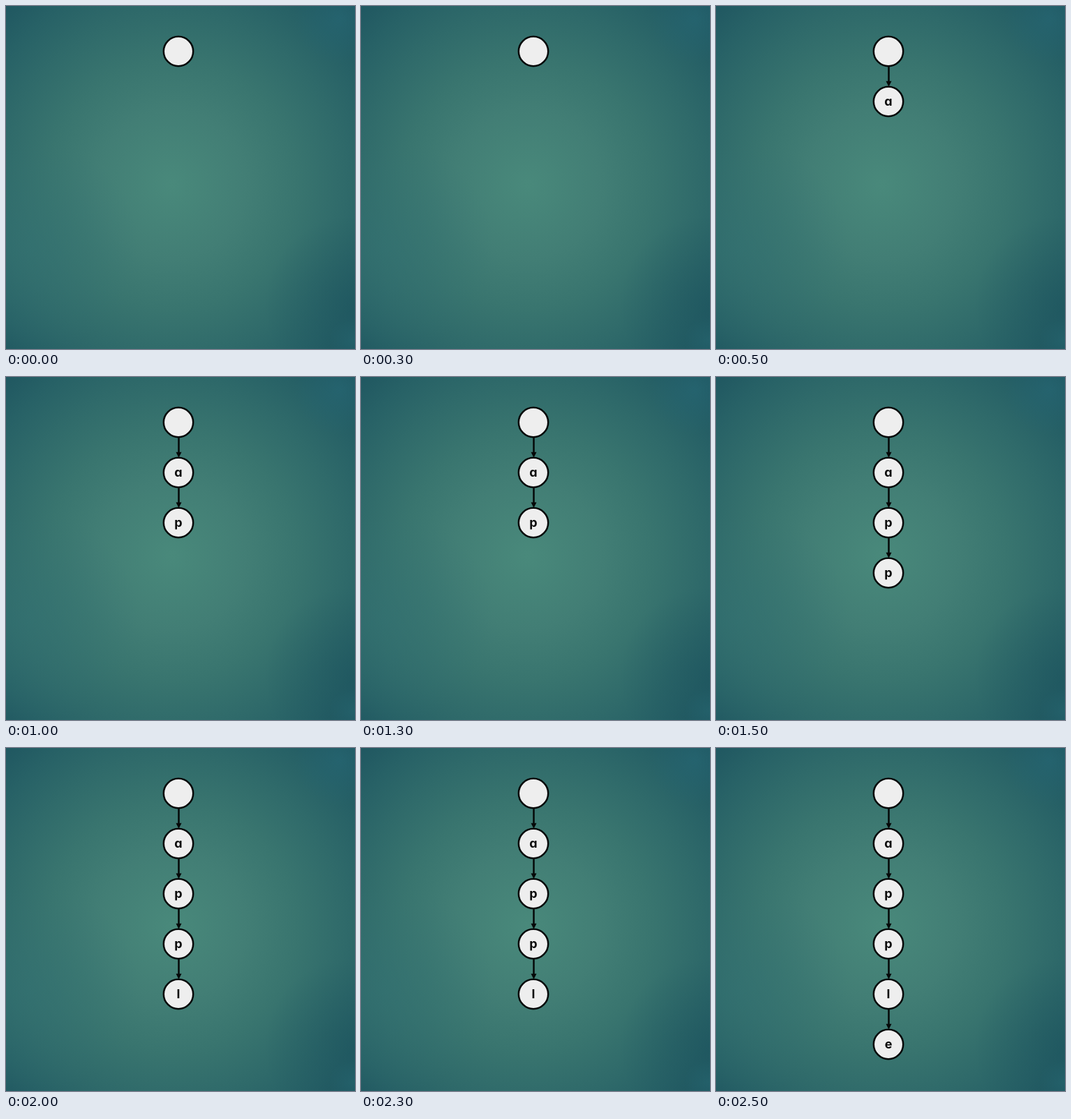
These frames come from a looping animation (500 by 492 pixels, 3000 ms). An HTML page with a canvas:

```html
<!DOCTYPE html>
<html lang="en">
<head>
<meta charset="utf-8">
<title>Growing a trie</title>
<style>
  html, body { margin: 0; width: 100%; height: 100%; overflow: hidden; background: #2f6a6a; }
  svg, canvas { position: absolute; left: 0; top: 0; width: 500px; height: 492px; display: block; }
  text {
    font: 700 18px Inter, Lato, sans-serif;
    font-feature-settings: "cv11"; /* single-storey a */
    text-anchor: middle;
    fill: #0b0b0b;
  }
</style>
</head>
<body>
<canvas id="stage" width="500" height="492"></canvas>
<svg id="labels" viewBox="0 0 500 492"></svg>
<script>
const WIDTH = 500, HEIGHT = 492;
const STEP = 500;
const WORD = "apple";
const NODE = { x: 247, top: 65, gap: 72, radius: 21.2 };
const INK = "#050808";

const ctx = document.getElementById("stage").getContext("2d");
const labels = document.getElementById("labels");
const nodeY = i => NODE.top + i * NODE.gap;

const letters = [...WORD].map((char, i) => {
  const text = document.createElementNS("http://www.w3.org/2000/svg", "text");
  text.setAttribute("x", NODE.x);
  text.setAttribute("y", nodeY(i + 1) + 6);
  text.textContent = char;
  labels.append(text);
  return text;
});

function glow(x, y, radius, stops) {
  const gradient = ctx.createRadialGradient(x, y, 0, x, y, radius);
  stops.forEach(([at, color]) => gradient.addColorStop(at, color));
  ctx.fillStyle = gradient;
  ctx.fillRect(0, 0, WIDTH, HEIGHT);
}

function softSpot(x, y, radius, rgb, alpha) {
  glow(x, y, radius, [
    [0, `rgba(${rgb},${alpha})`],
    [0.5, `rgba(${rgb},${alpha / 2})`],
    [1, `rgba(${rgb},0)`]
  ]);
}

function drawBackground() {
  glow(238, 256, 355, [
    [0, "#49897b"], [0.3, "#427e75"], [0.5, "#39756f"],
    [0.7, "#2f6a6a"], [0.85, "#276166"], [1, "#1f5660"]
  ]);
  softSpot(40, 345, 150, "52,114,114", 0.6);
  softSpot(500, 430, 130, "27,82,93", 0.5);
  softSpot(478, 18, 65, "38,102,114", 0.75);
  softSpot(498, 480, 35, "38,102,112", 0.6);
}

function drawArrow(from, to) {
  const x = NODE.x + 0.5;
  ctx.fillStyle = INK;
  ctx.fillRect(x - 1.25, from, 2.5, to - from - 4);
  ctx.beginPath();
  ctx.moveTo(x - 4, to - 7);
  ctx.lineTo(x + 4, to - 7);
  ctx.lineTo(x, to + 1);
  ctx.fill();
}

function drawNode(y) {
  ctx.beginPath();
  ctx.arc(NODE.x, y, NODE.radius, 0, Math.PI * 2);
  ctx.fillStyle = "#eeeeee";
  ctx.fill();
  ctx.strokeStyle = INK;
  ctx.lineWidth = 2.5;
  ctx.stroke();
}

function render(depth) {
  drawBackground();
  for (let i = 0; i <= depth; i++) {
    if (i) drawArrow(nodeY(i - 1) + NODE.radius, nodeY(i) - NODE.radius - 1);
    drawNode(nodeY(i));
  }
  letters.forEach((text, i) => text.setAttribute("visibility", i < depth ? "visible" : "hidden"));
}

let start, shown;
function tick(now) {
  start ??= now;
  const depth = Math.floor((now - start) / STEP) % (WORD.length + 1);
  if (depth !== shown) render(shown = depth);
  requestAnimationFrame(tick);
}

requestAnimationFrame(tick);
</script>
</body>
</html>
```
